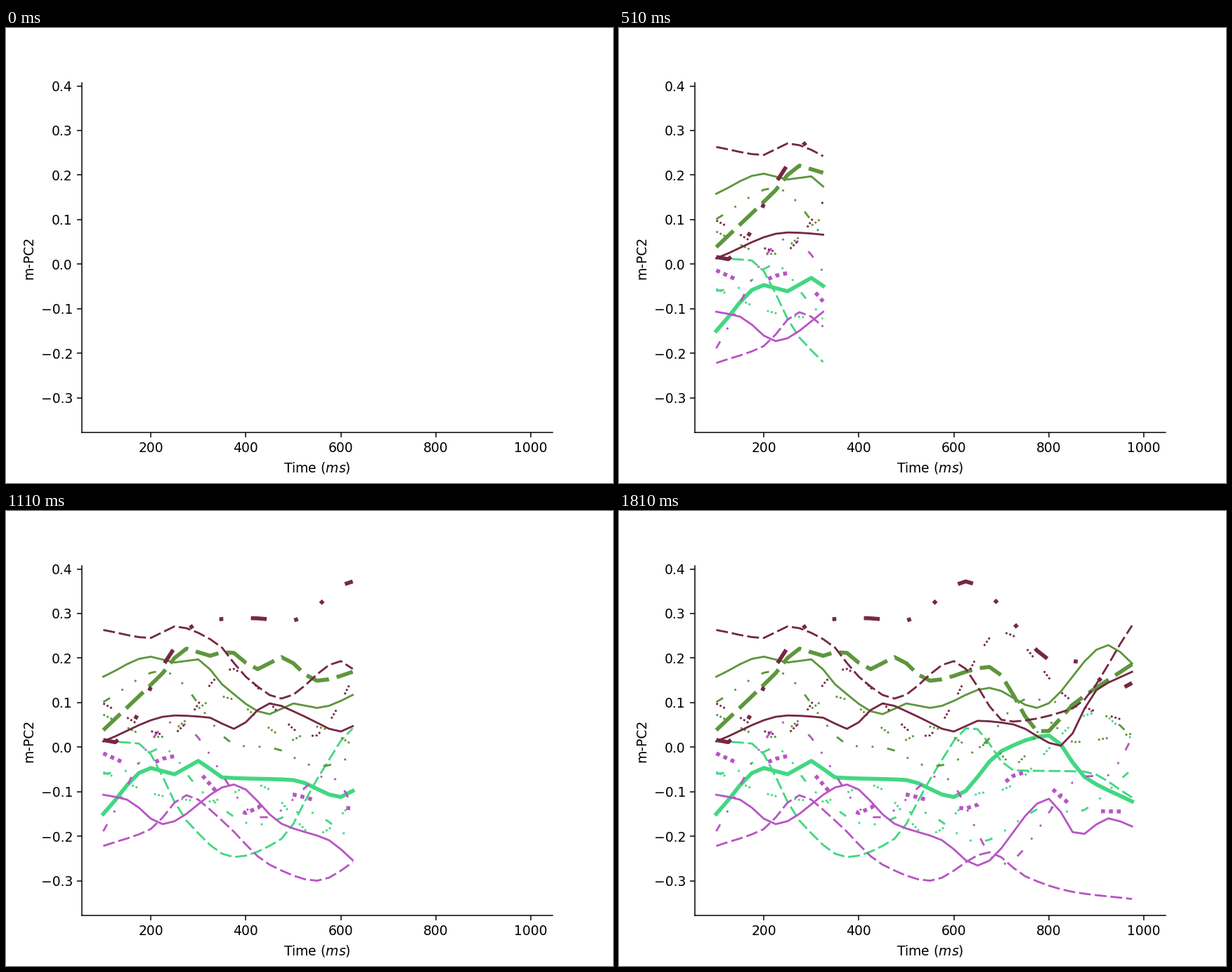
These frames come from a looping animation (864 by 648 pixels, 1.86 s). A matplotlib script:

```python
import numpy as np
import matplotlib.pyplot as plt
from matplotlib.animation import FuncAnimation

LOOP, TICK = 1860, 10      # ms
HOLD, STEP = 110, 50       # empty axes first, then one sample per step
THIN, THICK = 1.5, 3

MINT, GREEN, PURPLE, MAROON = "#42d782", "#5e963c", "#b855c5", "#752844"
SOLID = "-"
DASH = (0, (6, 2))
DASH_DOTS = (0, (4, 7) + 2 * (1, 7))
DOTS = (0, 5 * (1,) + (9,))

plt.rcParams["font.family"] = "DejaVu Sans"
fig, ax = plt.subplots(figsize=(6.4, 4.8), dpi=135)
fig.subplots_adjust(bottom=0.111)
ax.set(xlim=(55, 1045), ylim=(-0.3781, 0.4075),
       xlabel="Time ($ms$)", ylabel="m-PC2")
ax.spines[["top", "right"]].set_visible(False)

time = np.arange(100, 1000, 25)
traces = []


def smooth(x, y, t):
    """Cubic through key points that never overshoots: flat at every turn."""
    h = np.diff(x)
    d = np.diff(y) / h
    turn = d[:-1] * d[1:]
    inner = np.divide(2 * turn, d[:-1] + d[1:],
                      out=np.zeros_like(turn), where=turn > 0)
    m = np.concatenate([d[:1], inner, d[-1:]])
    i = np.clip(np.searchsorted(x, t, "right") - 1, 0, len(h) - 1)
    u = (t - x[i]) / h[i]
    a, b, s = m[i], m[i + 1], d[i]
    return y[i] + h[i] * u * (a + u * (3 * s - 2 * a - b + u * (a + b - 2 * s)))


def trace(color, style, width, *keys):
    """Add a curve from its turning points (ms, thousandths)."""
    x, y = np.array(keys, float).T
    line, = ax.plot([], [], color=color, ls=style, lw=width)
    traces.append((line, smooth(x, y / 1000, time)))


trace(MINT, SOLID, THICK, (100, -150), (200, -47), (250, -61), (300, -31),
      (350, -68), (500, -74), (600, -112), (700, -9), (800, 26),
      (875, -67), (975, -122))
trace(MINT, DASH, THIN, (100, 13), (175, 8), (275, -165), (375, -247),
      (475, -206), (550, -72), (637, 46), (725, -52), (875, -55), (975, -113))
trace(MINT, DASH_DOTS, THIN, (100, -60), (150, -53), (225, 2), (300, -93),
      (425, -175), (525, -143), (650, -214), (800, -134), (850, -148),
      (975, -50))
trace(MINT, DOTS, THIN, (100, -56), (225, -110), (325, -122), (425, -83),
      (550, -198), (650, -104), (700, -97), (900, 78), (975, 18))

trace(GREEN, SOLID, THIN, (100, 158), (200, 203), (250, 190), (300, 197),
      (350, 141), (450, 74), (500, 98), (550, 88), (675, 133), (775, 88),
      (925, 229), (975, 188))
trace(GREEN, DASH, THICK, (100, 38), (225, 166), (275, 221), (325, 205),
      (362, 216), (425, 175), (475, 202), (550, 149), (675, 180), (787, 31),
      (850, 95), (975, 186))
trace(GREEN, DASH_DOTS, THIN, (100, 101), (225, 172), (387, 2), (450, 0),
      (550, -44), (650, -6), (750, 108), (925, 68), (975, 22))
trace(GREEN, DOTS, THIN, (100, 73), (212, 21), (350, 114), (500, 16),
      (550, 46), (650, -3), (675, 13), (725, -47), (800, 60), (850, 11),
      (975, 30))

trace(PURPLE, SOLID, THIN, (100, -107), (150, -118), (225, -173), (375, -84),
      (475, -172), (575, -209), (650, -266), (800, -116), (862, -199),
      (925, -160), (975, -178))
trace(PURPLE, DASH, THIN, (100, -222), (200, -184), (275, -108), (350, -165),
      (450, -264), (550, -300), (675, -236), (750, -290), (850, -325),
      (975, -341))
trace(PURPLE, DASH_DOTS, THIN, (100, -189), (250, 60), (437, -160),
      (575, -61), (700, -265), (875, -66), (925, -63), (975, 22))
trace(PURPLE, DOTS, THICK, (100, -14), (175, -44), (250, -20), (400, -148),
      (475, -104), (625, -138), (750, -56), (875, -143), (975, -145))

trace(MAROON, SOLID, THIN, (100, 13), (250, 71), (325, 66), (375, 41),
      (450, 98), (525, 68), (600, 35), (650, 59), (725, 51), (825, 3),
      (900, 128), (975, 169))
trace(MAROON, DASH, THIN, (100, 263), (200, 245), (250, 271), (337, 235),
      (400, 158), (475, 109), (600, 193), (712, 57), (850, 87), (975, 273))
trace(MAROON, DASH_DOTS, THICK, (100, 16), (125, 11), (225, 182), (300, 281),
      (400, 290), (500, 284), (625, 372), (825, 188), (862, 195),
      (937, 126), (975, 144))
trace(MAROON, DOTS, THIN, (100, 98), (240, 26), (365, 177), (537, 22),
      (700, 260), (850, 102), (975, 54))


def draw(frame):
    t = frame * TICK
    n = 0 if t < HOLD else 2 + (t - HOLD) // STEP
    for line, values in traces:
        line.set_data(time[:n], values[:n])
    return [line for line, _ in traces]


anim = FuncAnimation(fig, draw, frames=LOOP // TICK, interval=TICK,
                     repeat=True, repeat_delay=0)
plt.show()
```
